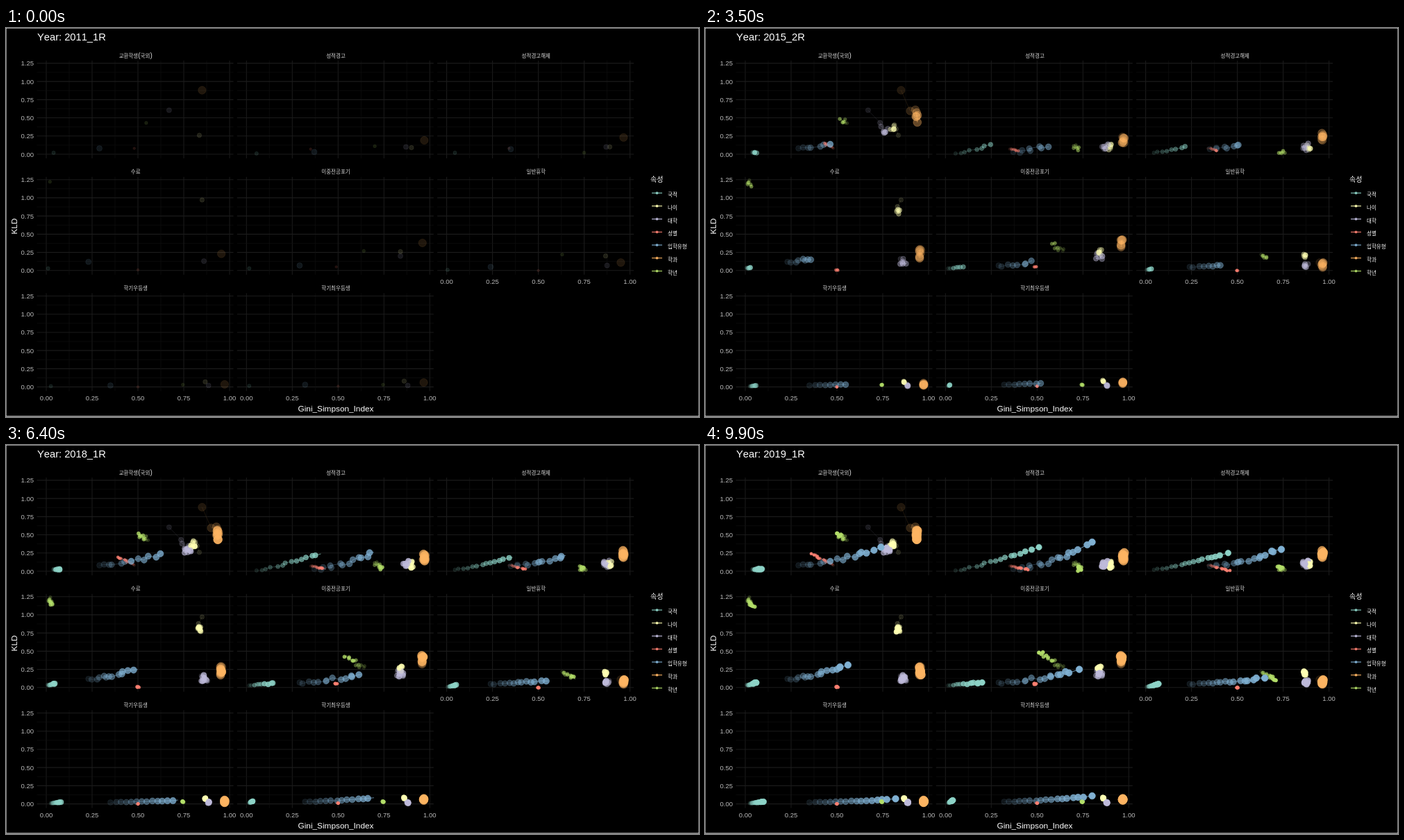
An HTML page with a canvas for the animation above (10 s loop, 998 px wide and 561 px high).

```html
<!DOCTYPE html>
<html lang="ko">
<head>
<meta charset="utf-8">
<title>KLD by Gini-Simpson index</title>
<style>
html, body { margin: 0; width: 100%; height: 100%; overflow: hidden; background: #000; }
canvas, svg { position: absolute; left: 0; top: 0; width: 998px; height: 561px; }
text { font-family: "Liberation Sans", Arial, "Noto Sans CJK KR", "Noto Sans CJK", sans-serif; font-kerning: none; }
</style>
</head>
<body>
<canvas id="plot" width="998" height="561"></canvas>
<svg id="labels" viewBox="0 0 998 561"></svg>
<script>
const ctx = document.getElementById('plot').getContext('2d');
const svg = document.getElementById('labels');
const LAST = 16, END = 20;
const UX = 264, UY = 104.9;
const px = (col, g) => 58 + 288.3 * col + g * UX;
const py = (row, k) => 182 + 167.8 * row - k * UY;

// a steady walk with a longer last step, or a quick settling
const walk = i => i < LAST ? 0.9 * i / (LAST - 1) : 1;
const settle = i => 1 - 0.35 ** i;

// r: first and last radius; wob: wobble in x and y; bend: power of the climb
const kinds = [
  { name: '국적', color: '#8DD3C7', r: [2.6, 4.2], wob: [2, 1], pace: walk, bend: 1.2 },
  { name: '나이', color: '#FFFFB3', r: [3.2, 3.7], wob: [3, 5], pace: settle, bend: 1 },
  { name: '대학', color: '#BEBADA', r: [3.6, 4.1], wob: [5, 5], pace: settle, bend: 1 },
  { name: '성별', color: '#FB8072', r: [1.8, 2], wob: [2, 1], pace: walk, bend: 1 },
  { name: '입학유형', color: '#80B1D3', r: [4, 4.8], wob: [5, 2.5], pace: walk, bend: 1.6 },
  { name: '학과', color: '#FDB462', r: [5.7, 6.4], wob: [1.5, 7], pace: settle, bend: 1 },
  { name: '학년', color: '#B3DE69', r: [2.3, 2.6], wob: [4, 3], pace: walk, bend: 1 }
];

// each way, in the order of kinds: start and end, or a place to stay
const panels = [];
function panel(name, shake, ...ways) {
  const n = panels.length;
  panels.push({ name, shake, ways, col: n % 3, row: Math.floor(n / 3) });
}
panel('교환학생(국외)', 1, [.04, .02, .09, .03], [.835, .26, .8, .37], [.67, .605, .77, .3],
  [.48, .08, .36, .24], [.29, .08, .74, .33], [.85, .88, .935, .5], [.545, .43, .5, .52]);
panel('성적경고', 1, [.055, .01, .51, .33], [.9, .09], [.87, .1],
  [.35, .07, .45, .02], [.37, .03, .8, .4], [.97, .19], [.7, .11, .74, .02]);
panel('성적경고해제', 1, [.045, .02, .45, .25], [.89, .1], [.87, .1],
  [.34, .08, .46, .01], [.35, .07, .74, .3], [.965, .23], [.75, .02, .73, .06]);
panel('수료', 1, [.01, .03, .06, .07], [.85, .97, .835, .8], [.86, .13],
  [.5, .01], [.23, .12, .56, .31], [.955, .23], [.02, 1.22, .04, 1.12]);
panel('이중전공포기', 1, [.015, .03, .2, .07], [.84, .26], [.84, .2],
  [.49, .05], [.29, .07, .73, .25], [.96, .38], [.64, .27, .51, .48]);
panel('일반휴학', .6, [.005, .01, .07, .05], [.867, .2], [.875, .07],
  [.5, 0], [.24, .05, .65, .13], [.95, .11, .965, .07], [.63, .22, .71, .1]);
panel('학기우등생', .25, [.025, .01, .1, .03], [.867, .07], [.885, .02],
  [.5, 0], [.35, .02, .82, .07], [.973, .035], [.745, .03]);
panel('학기최우등생', .25, [.015, .015, .04, .05], [.86, .08], [.88, .02],
  [.5, .01], [.32, .03, .8, .11], [.967, .06], [.745, .03]);

let seed = 11;
function wobble(size) {
  seed = (seed * 16807) % 2147483647;
  return (seed / 2147483647 * 2 - 1) * size;
}

// one point per term; the first and last stay in place
function trail(p, way, kind) {
  const [g0, k0, g1 = g0, k1 = k0] = way;
  const pts = [];
  for (let i = 0; i <= LAST; i++) {
    const u = kind.pace(i), shake = i % LAST ? p.shake : 0;
    pts.push({
      x: px(p.col, g0 + (g1 - g0) * u) + wobble(kind.wob[0] * shake),
      y: py(p.row, k0 + (k1 - k0) * u ** kind.bend) + wobble(kind.wob[1] * shake)
    });
  }
  return pts;
}

const series = panels.flatMap(p =>
  p.ways.map((way, k) => ({ kind: kinds[k], pts: trail(p, way, kinds[k]) })));

const due = i => i < LAST ? i : END;
const shade = i => 0.12 + 0.055 * i;

function text(str, x, y, size, fill, anchor = 'start') {
  const el = document.createElementNS('http://www.w3.org/2000/svg', 'text');
  const set = { x, y, fill, 'font-size': size, 'text-anchor': anchor };
  for (const k in set) el.setAttribute(k, set[k]);
  el.textContent = str;
  svg.append(el);
  return el;
}

const title = text('', 45, 18, 14.7, '#fff');
text('Gini_Simpson_Index', 475, 553, 11.8, '#fff', 'middle');
text('KLD', 0, 0, 11.8, '#fff', 'middle').setAttribute('transform', 'translate(16 286) rotate(-90)');
for (const p of panels) {
  const label = text('', px(p.col, 0.4875), py(p.row, 0) - 139.5, 7.5, '#d9d9d9', 'middle');
  for (const part of p.name.split(/([()])/)) {
    const span = document.createElementNS('http://www.w3.org/2000/svg', 'tspan');
    span.textContent = part;
    if (/[()]/.test(part)) span.setAttribute('font-size', 10);
    label.append(span);
  }
}
for (let n = 0; n < 3; n++) {
  for (let v = 0; v <= 1.25; v += 0.25) {
    text(v.toFixed(2), 40, py(n, v) + 3.5, 9.5, '#b9b9b9', 'end');
    if (v <= 1) text(v.toFixed(2), px(n, v), n < 2 ? 537 : 369, 9.5, '#b9b9b9', 'middle');
  }
}
text('속성', 928, 221.5, 10, '#fff');
const legendY = i => 238 + 18.75 * i;
kinds.forEach((k, i) => text(k.name, 953, legendY(i) + 5, 7.5, '#fff'));

function line(x1, y1, x2, y2) {
  ctx.beginPath();
  ctx.moveTo(x1, y1);
  ctx.lineTo(x2, y2);
  ctx.stroke();
}

function grid({ col, row }) {
  const x = px(col, 0), y = py(row, 0);
  for (let i = 0; i <= 10; i++) {
    ctx.strokeStyle = i % 2 ? '#101010' : '#1b1b1b';
    ctx.lineWidth = i % 2 ? 0.7 : 1.1;
    const gx = px(col, i / 8), gy = py(row, i / 8);
    line(x - 13.5, gy, x + 269.5, gy);
    if (i <= 8) line(gx, y - 135, gx, y + 6);
  }
}

function dot(x, y, r) {
  ctx.beginPath();
  ctx.arc(x, y, r, 0, 7);
  ctx.fill();
  ctx.stroke();
}

function paint(color, alpha) {
  ctx.fillStyle = ctx.strokeStyle = color;
  ctx.globalAlpha = alpha;
}

function backdrop() {
  paint('#000', 1);
  ctx.fillRect(0, 0, 998, 561);
  panels.forEach(grid);
  ctx.strokeStyle = '#fff';
  ctx.lineWidth = 1;
  ctx.strokeRect(0, 0, 998, 560);
  kinds.forEach((k, i) => {
    paint(k.color, 1);
    ctx.lineWidth = 1.1;
    line(930, legendY(i), 945, legendY(i));
    ctx.lineWidth = 0.6;
    dot(937.5, legendY(i), 1.6);
  });
}

function termAt(p) {
  const n = Math.round(p);
  const half = n < 12 ? n : 12 + (n > 15) + (n > 17);
  const year = 2011 + (half >> 1) + (half > 5);
  return `${year}_${half % 2 + 1}R`;
}

function draw(p) {
  backdrop();
  ctx.lineWidth = 0.9;
  for (const { kind, pts } of series) {
    for (let i = 0; i < LAST && due(i) < p; i++) {
      const f = Math.min(1, (p - due(i)) / (due(i + 1) - due(i)));
      const a = pts[i], b = pts[i + 1];
      paint(kind.color, shade(i));
      line(a.x, a.y, a.x + (b.x - a.x) * f, a.y + (b.y - a.y) * f);
    }
  }
  ctx.lineWidth = 0.7;
  for (let i = 0; i <= LAST && due(i) <= p + 1e-6; i++) {
    for (const { kind, pts } of series) {
      const [r0, r1] = kind.r;
      paint(kind.color, shade(i));
      dot(pts[i].x, pts[i].y, r0 + (r1 - r0) * i / LAST);
    }
  }
  title.textContent = 'Year: ' + termAt(p);
}

const start = performance.now();
let shown = -1;
function tick() {
  const step = Math.floor((performance.now() - start) % 10000 / 100);
  if (step !== shown) {
    shown = step;
    draw(step * END / 99);
  }
  requestAnimationFrame(tick);
}
tick();
</script>
</body>
</html>
```
